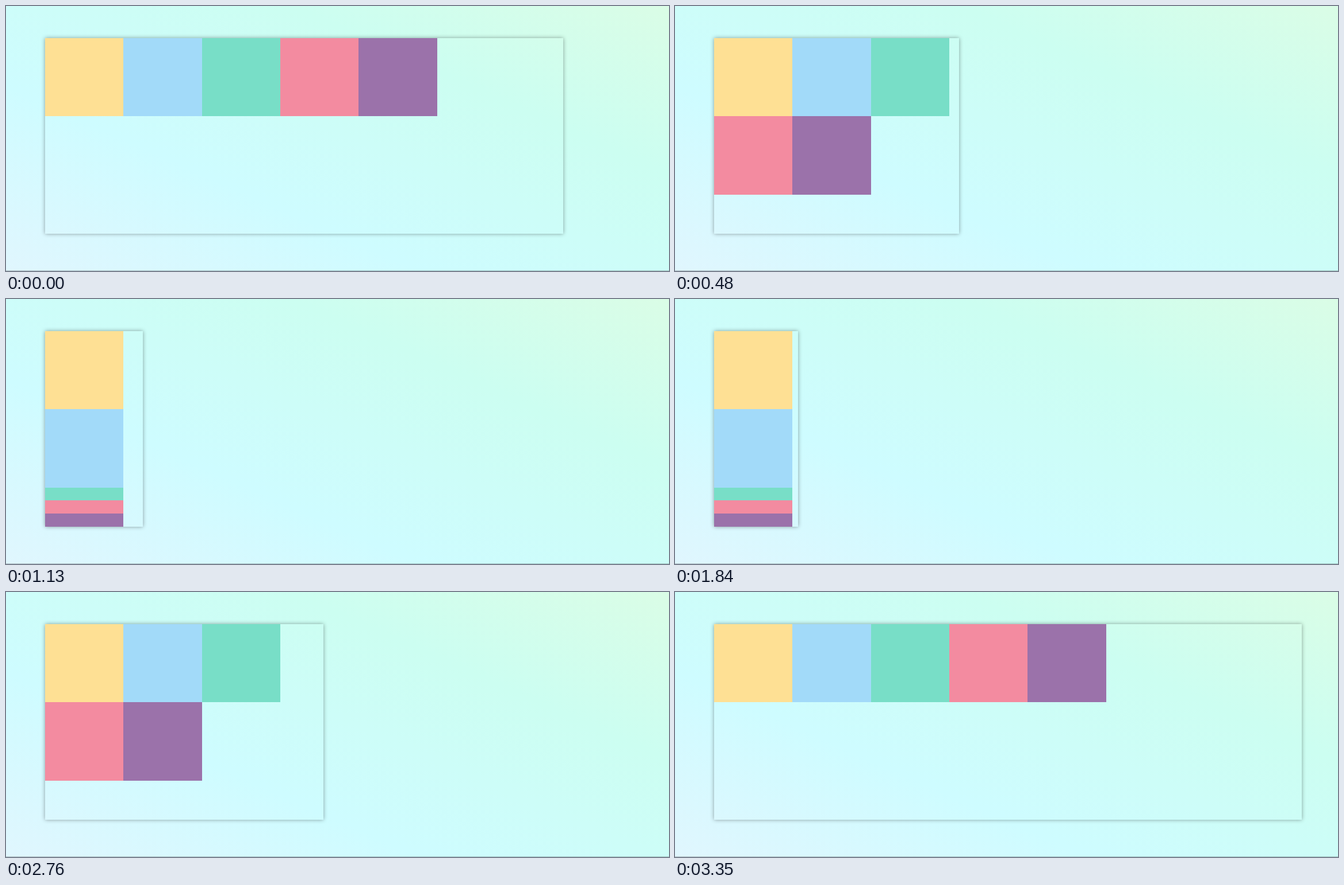
An HTML page that plays this animation: 1153 px wide and 462 px high, repeating every 3.38 s.

```html
<!DOCTYPE html>
<html lang="en">
<head>
<meta charset="utf-8">
<title>Responsive grid</title>
<style>
html, body { margin: 0; width: 100%; height: 100%; overflow: hidden; }
body {
  position: relative;
  background: linear-gradient(24deg, #e0f6fe 0%, #cefcff 33%, #ccfef1 70%, #dafde6 100%);
}
body::after {
  content: "";
  position: absolute;
  left: 0; right: 0; top: 461px;
  height: 1px;
  background: rgba(0, 0, 0, .24);
}
#grid {
  position: absolute;
  left: 68px; top: 56px;
  height: 341px;
  box-shadow: 0 0 7px rgba(0, 0, 0, .38);
}
#grid div { position: absolute; }
</style>
</head>
<body>
<div id="grid"></div>
<script>
const LOOP = 3380, HALF = 1815;
const LEFT = 68, TOP = 56, HEIGHT = 341, CELL = 136.36;
const MIN_W = 136.4, MAX_W = 1037.7;
const SHRUNK = 1575, REGROW = 1592;
const COLORS = ['#fee094', '#a2daf9', '#78dec7', '#f38ba0', '#9b72aa'];

const grid = document.getElementById('grid');
const items = COLORS.map(color => {
  const el = document.createElement('div');
  el.style.background = color;
  return grid.appendChild(el);
});

// cubic-bezier(.25, .1, .25, 1)
function ease(x) {
  let lo = 0, hi = 1, s = 0.5;
  for (let i = 0; i < 30; i++) {
    s = (lo + hi) / 2;
    if (0.75 * s * (1 - s) + s * s * s < x) lo = s; else hi = s;
  }
  const r = 1 - s;
  return 0.3 * s * r * r + 3 * s * s * r + s * s * s;
}

function widthAt(t) {
  const away = Math.max(SHRUNK - t, t - REGROW, 0) / HALF;
  return MIN_W + (MAX_W - MIN_W) * (1 - ease(1 - away));
}

function place(el, x0, y0, x1, y1) {
  const l = Math.round(LEFT + x0), t = Math.round(TOP + y0);
  el.style.left = l - LEFT + 'px';
  el.style.top = t - TOP + 'px';
  el.style.width = Math.round(LEFT + x1) - l + 'px';
  el.style.height = Math.round(TOP + y1) - t + 'px';
}

function draw(t) {
  const w = widthAt(t);
  grid.style.width = Math.round(LEFT + w) - LEFT + 'px';

  const cols = Math.max(1, Math.floor(w / CELL));
  const rows = Math.ceil(items.length / cols);
  // two fixed rows; any further rows share the remaining height
  const extra = (HEIGHT - 2 * CELL) / Math.max(1, rows - 2);
  const rowY = r => r <= 2 ? r * CELL : 2 * CELL + (r - 2) * extra;

  items.forEach((el, i) => {
    const c = i % cols, r = Math.floor(i / cols);
    place(el, c * CELL, rowY(r), (c + 1) * CELL, rowY(r + 1));
  });
}

const start = performance.now();
function tick() {
  draw((performance.now() - start) % LOOP);
  requestAnimationFrame(tick);
}
tick();
</script>
</body>
</html>
```
